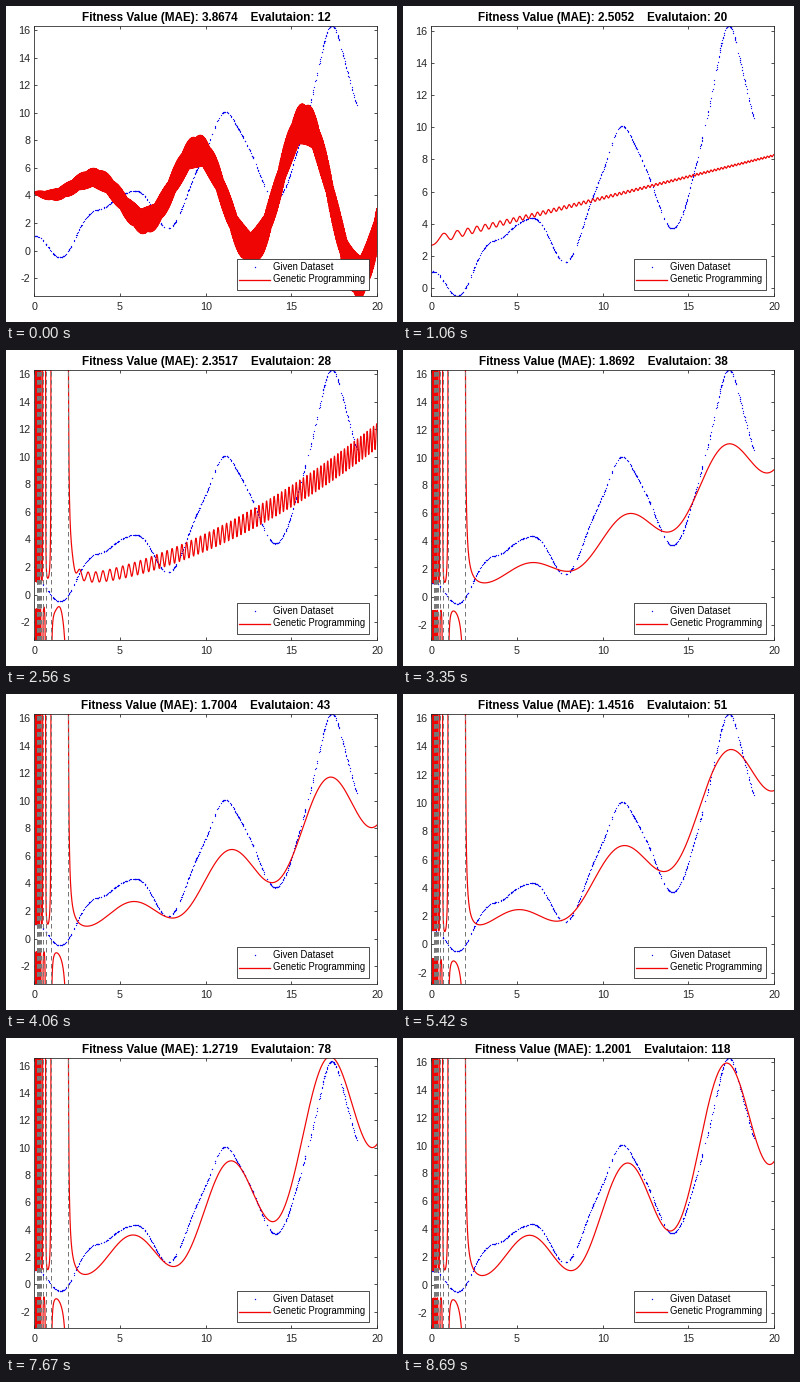
Animation, 391 px wide and 316 px high, one loop 8780 ms. Source, as a matplotlib script:

```python
import numpy as np
import matplotlib.pyplot as plt
from matplotlib.animation import FuncAnimation
from matplotlib.patches import Rectangle

W, H, DPI = 391, 316, 64
PX = 72 / DPI                      # points per pixel
LOOP, STEP = 8780, 20
INK, BLUE, RED, GRAY = "#262626", "#0808f0", "#f00505", "#777777"
plt.rcParams["font.family"] = "Liberation Sans"
plt.rcParams["axes.unicode_minus"] = False

POLE = 1.95                        # rightmost pole of 1/sin(pi*POLE/x)
X = np.linspace(0, 20, 3000)
X_POLE = np.concatenate([POLE * np.pi / np.linspace(22 * np.pi, np.pi, 8000),
                         np.linspace(POLE + 0.001, 20, 3000)])


def chirp(x):
    return np.cos(5.1 * x ** 1.5)


def band(k, spread):
    return X, 4.2 - k * X * np.cos(X) + spread * np.sqrt(X) * np.sin(190 * X)


def ripple(start, slope, amp):
    return X, start + slope * X - amp / (1 + 0.22 * X) * chirp(X)


def poles(a, k=0.0, w=1.08, phase=0.5, buzz=0.0):
    x = X_POLE
    csc = 1 / np.sin(np.pi * POLE / x)
    csc[np.abs(csc) > 40] = np.nan
    wave = k * x * np.cos(w * x + phase)
    return x, csc + a * x ** 2 + wave - buzz * np.sqrt(x) * chirp(x)


# start ms, evaluation, fitness, y limits, curve
STATES = [
    (0, 12, 3.8674, (-3.3, 16.33), band(0.32, 0.385)),
    (40, 15, 3.1426, (-1.6, 16.33), band(0.2, 0.3)),
    (570, 18, 2.5613, (-0.5, 16.33), ripple(3.1, 0.25, 0.4)),
    (1060, 20, 2.5052, (-0.5, 16.33), ripple(2.95, 0.265, 0.3)),
    (1940, 25, 2.4138, (-2.9, 16.33), poles(0.017, buzz=0.2)),
    (2470, 28, 2.3517, (-3.3, 16.33), poles(0.0205, buzz=0.2)),
    (2910, 33, 2.1045, (-3.0, 16.33), poles(0.0205, 0.06)),
    (3350, 38, 1.8692, (-3.1, 16.33), poles(0.0205, 0.12)),
    (3790, 43, 1.7004, (-3.3, 16.33), poles(0.0205, 0.165)),
    (4850, 47, 1.5731, (-3.1, 16.33), poles(0.024, 0.165, 1.0, 1.8)),
    (5120, 51, 1.4516, (-2.8, 16.33), poles(0.027, 0.165, 1.0, 1.8)),
    (5820, 54, 1.4087, (-2.8, 16.33), poles(0.028, 0.2, 1.0, 1.8)),
    (6170, 57, 1.3564, (-3.2, 16.33), poles(0.03, 0.24)),
    (6750, 60, 1.3122, (-3.3, 17.0), poles(0.0325, 0.27)),
    (7500, 78, 1.2719, (-3.2, 16.6), poles(0.031, 0.275)),
    (7940, 96, 1.2338, (-3.2, 16.4), poles(0.0295, 0.28)),
    (8640, 118, 1.2001, (-3.1, 16.33), poles(0.028, 0.285)),
]
STARTS = np.array([s[0] for s in STATES])

fig = plt.figure(figsize=(W / DPI, H / DPI), dpi=DPI, facecolor="white")

# plot area
ax = fig.add_axes([28.4 / W, 26 / H, 342.6 / W, 270.5 / H])
ax.set_xlim(0, 20)
ax.set_xticks(range(0, 21, 5))
ax.set_yticks(range(-2, 17, 2))
ax.tick_params(direction="in", top=True, right=True, length=3.4 * PX,
               width=0.8 * PX, color=INK, labelcolor=INK,
               labelsize=10.8 * PX)
ax.tick_params(axis="x", pad=6 * PX)
ax.tick_params(axis="y", pad=4 * PX)
for spine in ax.spines.values():
    spine.set(linewidth=0.8 * PX, edgecolor=INK)

data_x = np.sort(np.random.default_rng(4).uniform(0, 6 * np.pi, 600))
ax.plot(data_x, data_x / (2 + np.sin(data_x)) + np.cos(2 * data_x), ".",
        color=BLUE, markersize=2.5 * PX, markeredgewidth=0)
fit, = ax.plot([], [], color=RED, linewidth=1.2 * PX)
asymptotes = [ax.axvline(POLE / n, color=GRAY, linewidth=1.0 * PX,
                         dashes=(4.5, 3.5), zorder=3) for n in range(1, 15)]

# title and legend, placed in pixels
top = fig.add_axes([0, 0, 1, 1], facecolor="none", zorder=2)
top.set(xlim=(0, W), ylim=(H, 0))
top.axis("off")
title = top.text(200, 14.6, "", ha="center", va="baseline", color="black",
                 fontsize=11.7 * PX, fontweight="bold")
top.add_patch(Rectangle((230.5, 252.5), 132, 31.5, facecolor="white",
                        edgecolor=INK, linewidth=0.8 * PX))
top.plot([249], [261], ".", color=BLUE, markersize=2.8 * PX,
         markeredgewidth=0)
top.plot([233, 264], [273.5, 273.5], color=RED, linewidth=1.3 * PX)
for y, label in ((264.3, "Given Dataset"), (276.5, "Genetic Programming")):
    top.text(267, y, label, fontsize=9.5 * PX, va="baseline", color="black")


def update(i):
    now = i * STEP + STEP / 2
    index = np.searchsorted(STARTS, now, side="right") - 1
    _, count, fitness, limits, curve = STATES[index]
    title.set_text(f"Fitness Value (MAE): {fitness:.4f}    Evalutaion: {count}")
    fit.set_data(*curve)
    ax.set_yticks([v for v in range(-2, 17, 2) if v >= limits[0]])
    ax.set_ylim(*limits)
    for line in asymptotes:
        line.set_visible(curve[0] is X_POLE)
    return fit, title


anim = FuncAnimation(fig, update, frames=LOOP // STEP, interval=STEP,
                     repeat=True, repeat_delay=0)
plt.show()
```
